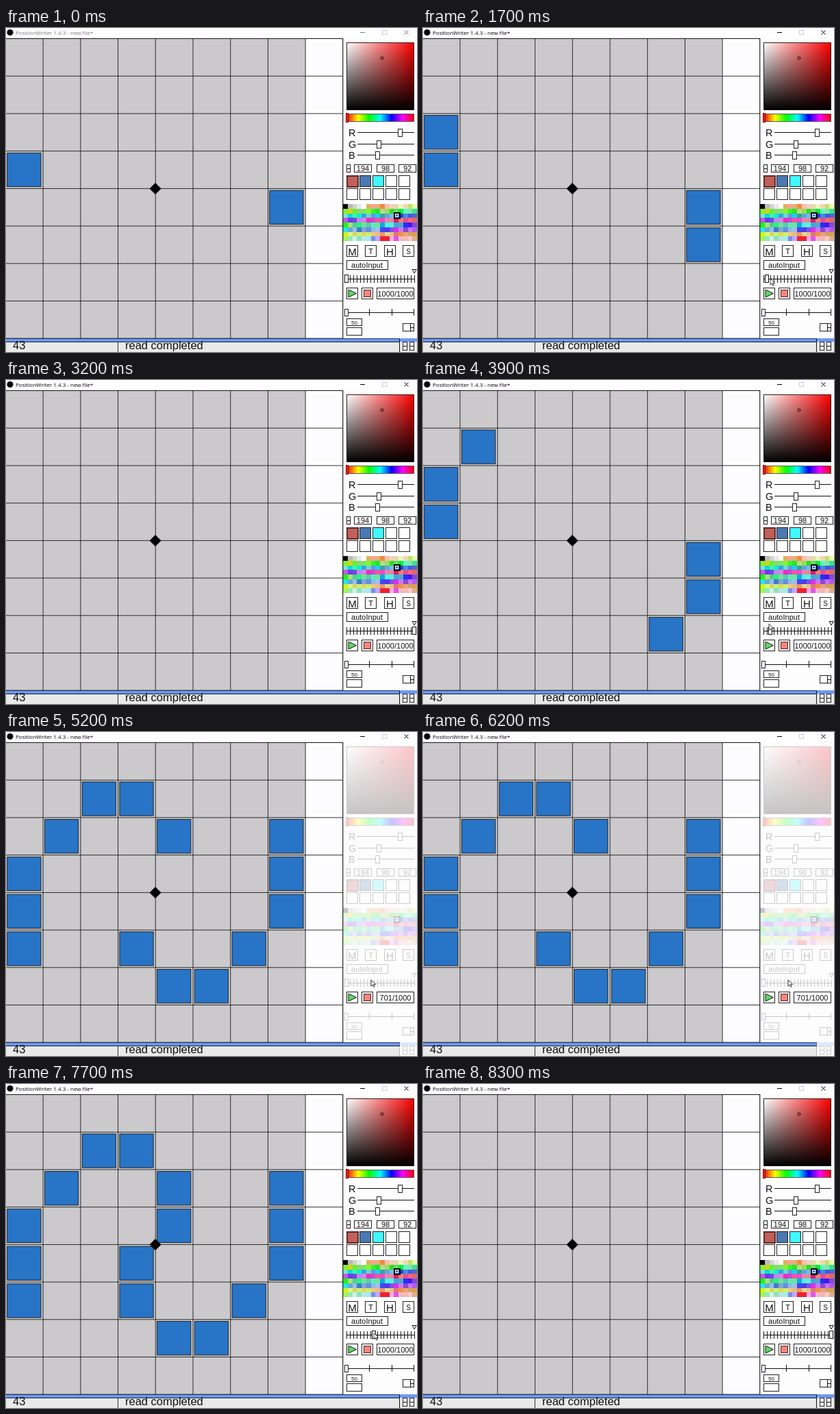
Recreate the animation shown at these times as an HTML page. Size 600 by 473 pixels, loop 8400 ms.

```html
<!DOCTYPE html>
<html lang="en">
<head>
<meta charset="utf-8">
<title>PositionWriter</title>
<style>
html, body { margin: 0; width: 100%; height: 100%; overflow: hidden; background: #fff; }
svg { display: block; width: 600px; height: 473px; font-family: "Liberation Sans", Arial, sans-serif; }
rect, .crisp { shape-rendering: crispEdges; }
#cells rect { shape-rendering: auto; }
.title { font: 8px "Open Sans", "Noto Sans", sans-serif; }
</style>
</head>
<body>
<svg id="stage" viewBox="0 0 600 473"></svg>
<script>
const stage = document.getElementById('stage');
const LOOP = 8400, CELL = 54.72, LEFT = -0.6, TOP = 15.5;
const TICK = 4.95, LAST = 20;
const PLAY_START = 4500, PLAY_END = 6500, STOPPED = 7100;

// Markup helpers
const box = (x, y, w, h, fill = '#fff', stroke = '#222', more = '') =>
  `<rect x="${x}" y="${y}" width="${w}" height="${h}" fill="${fill}" stroke="${stroke}" ${more}/>`;
const path = (d, more = '') => `<path d="${d}" fill="none" stroke="#111" ${more}/>`;
const label = (s, x, y, size, more = '') =>
  `<text x="${x}" y="${y}" font-size="${size}" fill="#111" ${more}>${s}</text>`;
const mid = 'text-anchor="middle"';
const crisp = 'class="crisp"';
const thin = 'stroke-width=".85"';
const range = (n, fn) => Array.from({ length: n }, (_, i) => fn(i)).join('');

function titleBar() {
  return box(0, 0, 600, 15, '#fff', 'none') +
    '<circle cx="6" cy="6.5" r="4.6" fill="#000"/>' +
    '<g id="title"><text class="title" x="14" y="10.4">PositionWriter 1.4.3 - new file*</text>' +
    '<path d="M517 6.5h7M581.5 3.5l6 6m0-6l-6 6" fill="none" stroke="currentColor"/></g>' +
    box(549.5, 3.5, 6, 6, 'none', '#ccc');
}

function grid() {
  return box(0, 15, 437, 439, '#cbc9cb', 'none') + box(437, 15, 55, 439, '#fdfdff', 'none') +
    range(9, i => path(`M${LEFT + (i + 1) * CELL} 15V453M0 ${TOP + i * CELL}H492`, thin));
}

function statusBar() {
  return box(0, 459, 575, 14, '#e9e9ea', 'none') +
    box(0, 453, 575, 6, '#6f98f0', 'none') +
    path('M0 453.3H575M0 458.3H575M163.4 459V473', thin) +
    label('43', 10, 469, 16.5) + label('read completed', 174, 469, 16.5);
}

// Swatch board: each row has a start hue, a hue span and a lightness
function palette() {
  let seed = 11;
  const rnd = () => (seed = seed * 16807 % 2147483647) / 2147483647;
  const rows = [[0, 60, 75], [70, 75, 60], [165, 70, 55], [265, 95, 62],
    [110, 130, 55], [175, 130, 66], [65, -50, 64], [110, 270, 76]];
  const size = 6.75;
  return rows.map(([hue, span, light], r) => range(16, c => {
    let fill = `hsl(${hue + span * c / 15 + rnd() * 50 - 25} ${55 + rnd() * 40}% ${light + rnd() * 28 - 14}%)`;
    if (r === 0 && c < 5) fill = c ? `hsl(0 0% ${64 + c * 9}%)` : '#000';
    if (r === 7 && (c === 8 || c === 9)) fill = '#ee2030';
    return box(492 + c * size, 257 + r * size, size + 0.2, size + 0.2, fill, 'none');
  })).join('') +
    box(566.5, 269.5, 8, 8, 'none', '#000', 'stroke-width="2"') +
    box(568.5, 271.5, 4, 4, '#2874c6', '#fff');
}

function colorPicker() {
  const channel = (name, y, x) => label(name, 500, y + 6, 14.5) +
    path(`M513 ${y + 0.5}H596`, crisp) + box(x - 2.5, y - 5, 6, 11);
  const number = (n, x) => box(x + 0.5, 199.5, 25, 11) + label(n, x + 13, 209, 11, mid);
  const swatches = ['#c0605a', '#4b78b2', '#40f8ff'];
  return box(497.5, 21.5, 98, 98, 'url(#sat)', 'none') + box(497.5, 21.5, 98, 98, 'url(#val)') +
    '<circle cx="549" cy="44" r="2" fill="none" stroke="#111"/>' +
    box(497.5, 125.5, 98, 11, 'url(#hue)', '#555') + box(496.5, 124.5, 3, 13, '#e22', '#711') +
    channel('R', 152, 575) + channel('G', 169, 544) + channel('B', 185, 542) +
    box(497.5, 199.5, 5, 11) + path('M498 205.5H503', crisp) +
    number(194, 508) + number(98, 541) + number(92, 573) +
    range(10, i => box(497.5 + i % 5 * 19, i < 5 ? 215.5 : 234.5, 16, 16, swatches[i] || '#fff',
      i ? '#222' : '#5c2a28', i ? '' : 'stroke-width="2"'));
}

function tools() {
  const button = (s, x, size) => box(x + 0.5, 317.5, 16, 16) + label(s, x + 8.5, 326 + size * 0.37, size, mid);
  return button('M', 497, 15) + button('T', 524, 11) + button('H', 552, 15) + button('S', 579, 10) +
    box(497.5, 339.5, 60, 13) + label('autoInput', 527, 350, 11, mid) +
    path('M593 352.5h6l-3 5.5z') +
    path('M497 366.5H596', crisp) +
    range(LAST + 1, i => path(`M${Math.round(497 + i * TICK) + 0.5} 361V372`, crisp)) +
    box(0, 360.5, 5, 11, '#fff', '#111', 'id="handle"') +
    path('M497 415.5H596', crisp) + speedTicks('') + box(494.5, 410.5, 5, 10) +
    box(497.5, 424.5, 22, 10) + label(50, 508.5, 432.5, 8, mid) + box(497.5, 437.5, 22, 11) +
    box(579.5, 431.5, 16, 11) + path('M590.5 432V443M590 437.5H596', crisp) +
    box(575, 453, 25, 20, '#e9e9ea', 'none') + box(575, 453, 25, 5, '#6f98f0', 'none') +
    path('M574.5 454V473', crisp) +
    [579.5, 589.5].map(x => box(x, 458.5, 6, 12) + path(`M${x} 464.5h6`, crisp)).join('');
}

function speedTicks(id) {
  return path('M497.5 410V420M530.5 410V420M563.5 410V420M595.5 410V420', `${crisp} ${id}`);
}

function player() {
  return box(497.5, 379.5, 16, 16) +
    '<path d="M500 382l11.5 5.5-11.5 5.5z" fill="#62d865" stroke="#111"/>' +
    box(519.5, 379.5, 16, 16) + box(522.5, 382.5, 10, 10, '#f2857f', '#522') +
    box(541.5, 379.5, 54, 16) + label('', 568.5, 391.5, 11, mid + ' id="count"');
}

const stops = list => list.map((c, i) => `<stop offset="${i / (list.length - 1)}" stop-color="${c}"/>`).join('');
stage.innerHTML =
  `<defs><linearGradient id="sat">${stops(['#fff', '#f00'])}</linearGradient>
  <linearGradient id="val" x2="0" y2="1"><stop stop-opacity="0"/><stop offset="1"/></linearGradient>
  <linearGradient id="hue">${stops(['#f00', '#ff0', '#0f0', '#0ff', '#00f', '#f0f', '#f00'])}</linearGradient></defs>` +
  grid() + '<g id="cells"></g><path d="M218 226l8.5 8.5-8.5 8.5-8.5-8.5z"/>' + statusBar() +
  box(492, 15, 108, 438, '#fefdfe', 'none') +
  `<g id="panel">${colorPicker()}${palette()}${tools()}</g>` + speedTicks('id="ticks"') + player() + titleBar() +
  path(`M0 ${TOP}H492M${LEFT + 9 * CELL} 15V453`, thin) +
  '<path id="cursor" d="M0 0V9l2.2-2 1.5 3.4 1.5-.7-1.5-3.2h3z" fill="#fff" stroke="#111" stroke-width=".8"/>';

const el = {};
for (const id of ['title', 'cells', 'panel', 'handle', 'ticks', 'count', 'cursor']) el[id] = document.getElementById(id);

// One arm of the pattern; the other is its half-turn
const GROW = [[0, 3], [0, 2], [1, 1], [2, 1], [3, 1], [4, 2], [4, 3]];
const LEAVE = [[0, 5], [0, 4], [0, 3], [1, 2], [2, 1], [3, 1], [4, 2], [4, 3]];
function arm(step) {
  if (step >= LAST) return [];
  if (step < 7) return GROW.slice(0, step + 1);
  if (step === 19) return LEAVE.slice(1, 2);
  return LEAVE.slice(0, step < 14 ? 8 : step === 14 ? 7 : 20 - step);
}
const square = ([c, r]) =>
  box(LEFT + c * CELL + 2.3, TOP + r * CELL + 2.7, 49.3, 49.3, '#2874c6', '#111', thin);
const pattern = step => arm(step).map(([c, r]) => square([c, r]) + square([7 - c, 7 - r])).join('');

// Keys are [time, ...values]
const DRAG = [[1400, 0], [1700, 1], [3000, 20], [3200, 20], [3900, 2], [4100, 0], [7400, 0], [8200, 20]];
const POINTER = [[500, 162, 145], [1200, 497, 360], [1300, 497, 360], [1700, 507, 366], [3000, 602, 367],
  [3200, 602, 362], [3900, 505, 356], [4100, 498, 360], [4400, 505, 387], [4600, 506, 387], [5200, 533, 362],
  [6500, 533, 362], [6900, 527, 387], [7100, 527, 387], [7300, 498, 362], [7400, 498, 362], [8200, 602, 366]];
function track(keys, t) {
  const next = keys.findIndex(k => k[0] > t);
  if (next === 0) return keys[0].slice(1);
  if (next < 0) return keys[keys.length - 1].slice(1);
  const a = keys[next - 1], b = keys[next], p = (t - a[0]) / (b[0] - a[0]);
  return a.slice(1).map((v, i) => v + (b[i + 1] - v) * p);
}

let shown = -1;
function draw(t) {
  const playing = t >= PLAY_START && t < STOPPED;
  const count = t >= PLAY_START && t < PLAY_END ? (t - PLAY_START) % 1000 + 1 : 1000;
  const slider = Math.round(track(DRAG, t)[0]);
  const step = playing ? Math.min(19, Math.floor(count / 50)) : slider;
  if (step !== shown) el.cells.innerHTML = pattern(shown = step);
  el.handle.setAttribute('x', Math.round(494 + slider * TICK) + 0.5);
  el.panel.setAttribute('opacity', playing ? 0.22 : 1);
  el.ticks.setAttribute('visibility', playing && t >= 6800 ? 'visible' : 'hidden');
  el.count.textContent = count + '/1000';
  const ink = t < 1400 ? '#777' : '#000';
  el.title.setAttribute('fill', ink);
  el.title.setAttribute('color', ink);
  const [x, y] = track(POINTER, t);
  el.cursor.setAttribute('transform', `translate(${x} ${y})`);
  el.cursor.setAttribute('visibility', t < 500 ? 'hidden' : 'visible');
}

const start = performance.now();
function tick(now) {
  draw(Math.floor(Math.max(0, now - start) % LOOP / 100) * 100);
  requestAnimationFrame(tick);
}
draw(0);
requestAnimationFrame(tick);
</script>
</body>
</html>
```
